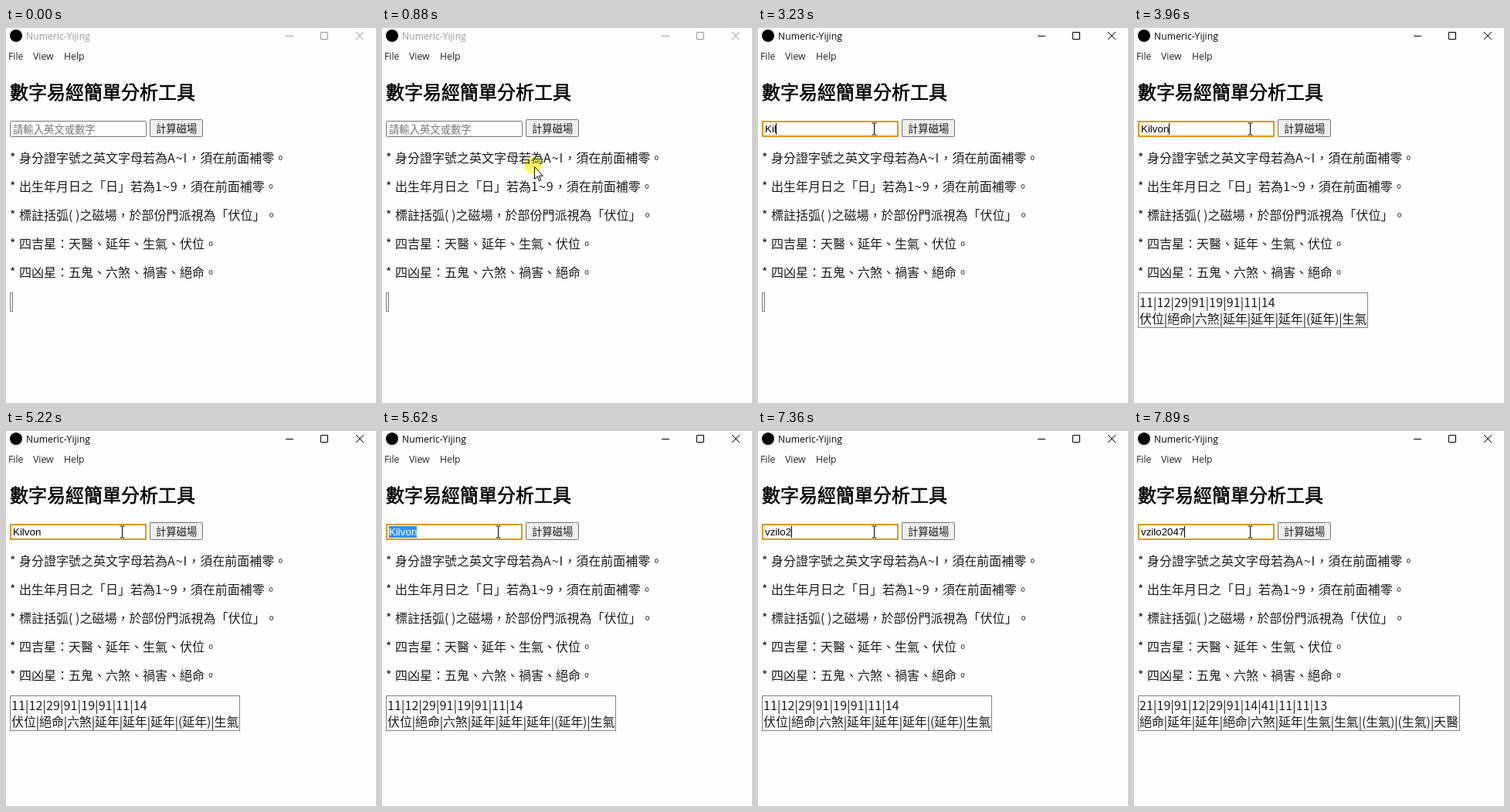
These frames come from a looping animation (479 px wide and 485 px high, 8 s). An HTML page:

```html
<!DOCTYPE html>
<html lang="zh-Hant">
<head>
<meta charset="utf-8">
<title>Numeric-Yijing</title>
<style>
html, body { margin: 0; width: 100%; height: 100%; overflow: hidden; background: #fefefe; }
svg { display: block; }
text {
  font-family: "Noto Sans CJK TC", "Noto Sans CJK JP", sans-serif; font-weight: 300;
  text-spacing-trim: space-all; fill: #1c1c1c; white-space: pre;
}
.ui text { font: 12.3px "Open Sans", "Noto Sans", sans-serif; fill: #222; }
.ui #title { font-size: 12.2px; fill: #999; }
.active .ui #title { fill: #000; }
#controls { fill: none; stroke: #999; }
.active #controls { stroke: #000; }
.heading { font-size: 24px; font-weight: 400; fill: #000; stroke: #000; stroke-width: .6; }
.body { font-size: 16px; }
.latin { letter-spacing: 1px; }
.small { font-size: 13.333px; }
#hint { fill: #757575; }
#value { font: 13.333px "Liberation Sans", Arial, sans-serif; fill: #000; }
.selected #value { fill: #fff; }
#field { fill: #fff; stroke: #767676; }
.hover #field { stroke: #444; }
#ring { fill: none; stroke: #e59700; stroke-width: 2; }
.frame { fill: none; stroke: #808080; }
#glow { fill: #ffff5c; mix-blend-mode: multiply; }
</style>
</head>
<body>
<svg id="stage" width="479" height="485" viewBox="0 0 479 485">
  <rect width="479" height="485" fill="#fefefe"/>
  <g class="ui">
    <circle cx="13" cy="10" r="8"/>
    <text id="title" x="26" y="15">Numeric-Yijing</text>
    <text x="3" y="41">File</text>
    <text x="35" y="41">View</text>
    <text x="75" y="41">Help</text>
  </g>
  <path id="controls" d="M362 10.5h10M407.5 5.5h9v9h-9zM453 5l10 10M463 5l-10 10"/>

  <text class="heading" x="5" y="92">數字易經簡單分析工具</text>
  <rect id="field" x="5.5" y="120.5" width="176" height="20" rx="1"/>
  <rect id="ring" x="6" y="121" width="175" height="19" rx="2"/>
  <rect id="selection" x="9" y="123" height="15" fill="#3390ff"/>
  <text id="hint" class="small" x="9" y="136">請輸入英文或數字</text>
  <text id="value" x="9" y="135"></text>
  <rect id="caret" y="123" width="1" height="15"/>
  <rect x="186.5" y="118.5" width="68" height="22" rx="1.5" fill="#efefef" stroke="#767676"/>
  <text class="small" x="194" y="135">計算磁場</text>

  <g class="body">
    <text y="174"><tspan x="5">*</tspan><tspan x="17">身分證字號之英文字母若為</tspan><tspan class="latin">A~I</tspan>，須在前面補零。</text>
    <text y="211"><tspan x="5">*</tspan><tspan x="17">出生年月日之「日」若為</tspan><tspan class="latin">1~9</tspan>，須在前面補零。</text>
    <text y="248"><tspan x="5">*</tspan><tspan x="17">標註括弧( )之磁場，於部份門派視為「伏位」。</tspan></text>
    <text y="285"><tspan x="5">*</tspan><tspan x="17">四吉星：天醫、延年、生氣、伏位。</tspan></text>
    <text y="322"><tspan x="5">*</tspan><tspan x="17">四凶星：五鬼、六煞、禍害、絕命。</tspan></text>
  </g>

  <rect id="frame" class="frame" x="5.5" y="342.5"/>
  <text id="pairs" class="body" x="7" y="361" letter-spacing=".15"></text>
  <text id="stars" class="body" x="7" y="382" letter-spacing="-.11"></text>

  <circle id="glow" r="11"/>
  <g id="mouse">
    <path id="arrow" d="M0 0v16l3.700-3.500 2.500 5.800 2.200-1-2.500-5.600h5z" fill="#fff" stroke="#000"/>
    <path id="beam" d="M-3-7.500h2.500l.5.500.5-.5h2.500M0-7v14M-3 7.500h2.500l.5-.5.5.5h2.500" fill="none" stroke="#000"/>
  </g>
</svg>
<script>
const LOOP = 8000;
const $ = id => document.getElementById(id);
const show = (id, on) => { $(id).style.display = on ? '' : 'none'; };
const setText = (id, s) => { if ($(id).textContent !== s) $(id).textContent = s; };
const set = (id, attrs) => { for (const k in attrs) $(id).setAttribute(k, attrs[k]); };

const words = [
  { text: 'Kilvon', keys: [2830, 3030, 3230, 3360, 3430, 3630] },
  { text: 'vzilo2047', keys: [6300, 6500, 6770, 6970, 7100, 7300, 7430, 7500, 7620] }
];
const results = [
  { at: 0, w: 3, h: 24, pairs: '', stars: '' },
  { at: 3960, w: 297, h: 45, pairs: '11|12|29|91|19|91|11|14',
    stars: '伏位|絕命|六煞|延年|延年|延年|(延年)|生氣' },
  { at: 7890, w: 416, h: 45, pairs: '21|19|91|12|29|91|14|41|11|11|13',
    stars: '絕命|延年|延年|絕命|六煞|延年|生氣|生氣|(生氣)|(生氣)|天醫' }
];
// Times at which the caret toggles, starting hidden
const blinks = [1420, 1950, 2500, 4160, 4690, 5220, 6300];

function pointer(t) {
  if (t >= 1750) return [150, 130];
  const step = Math.min(9, Math.floor((t - 530) / 76.6));
  const u = step / 9;
  return [
    Math.round(284 - 135 * Math.sin(u * Math.PI / 2)),
    Math.round(322 - 192 * Math.sin(u * 1.82) / Math.sin(1.82))
  ];
}

function drawMouse(t) {
  const visible = t >= 530;
  show('mouse', visible);
  show('glow', visible && t < 1490);
  const [x, y] = pointer(t);
  const hover = visible && y > 119 && y < 142 && x < 182;
  const overNote = y > 150 && Math.abs((y - 149.5) % 37 - 18.5) < 11;
  const beam = hover || overNote;
  show('beam', beam);
  show('arrow', !beam);
  set('mouse', { transform: `translate(${x + .5} ${y + .5})` });
  set('glow', { cx: x - 1.5, cy: y - 1 });
  $('stage').classList.toggle('hover', hover);
}

function drawField(t) {
  const word = words[t < words[1].keys[0] ? 0 : 1];
  const typed = word.text.slice(0, word.keys.filter(k => k <= t).length);
  const selected = t >= 5620 && t < 6300;
  setText('value', typed);
  const width = typed ? $('value').getComputedTextLength() : 0;
  set('caret', { x: Math.floor(9 + width) });
  set('selection', { width: Math.floor(width) });
  show('hint', !typed);
  show('ring', t >= 1420);
  show('selection', selected);
  show('caret', blinks.filter(b => b <= t).length % 2 === 1);
  $('stage').classList.toggle('selected', selected);
}

function drawResult(t) {
  const r = results.filter(r => r.at <= t).pop();
  set('frame', { width: r.w, height: r.h });
  setText('pairs', r.pairs);
  setText('stars', r.stars);
}

function draw(now) {
  const t = now % LOOP;
  $('stage').classList.toggle('active', t >= 1350);
  drawMouse(t);
  drawField(t);
  drawResult(t);
}

let start;
function tick(now) {
  start ??= now;
  draw(now - start);
  requestAnimationFrame(tick);
}
draw(0);
requestAnimationFrame(tick);
</script>
</body>
</html>
```
